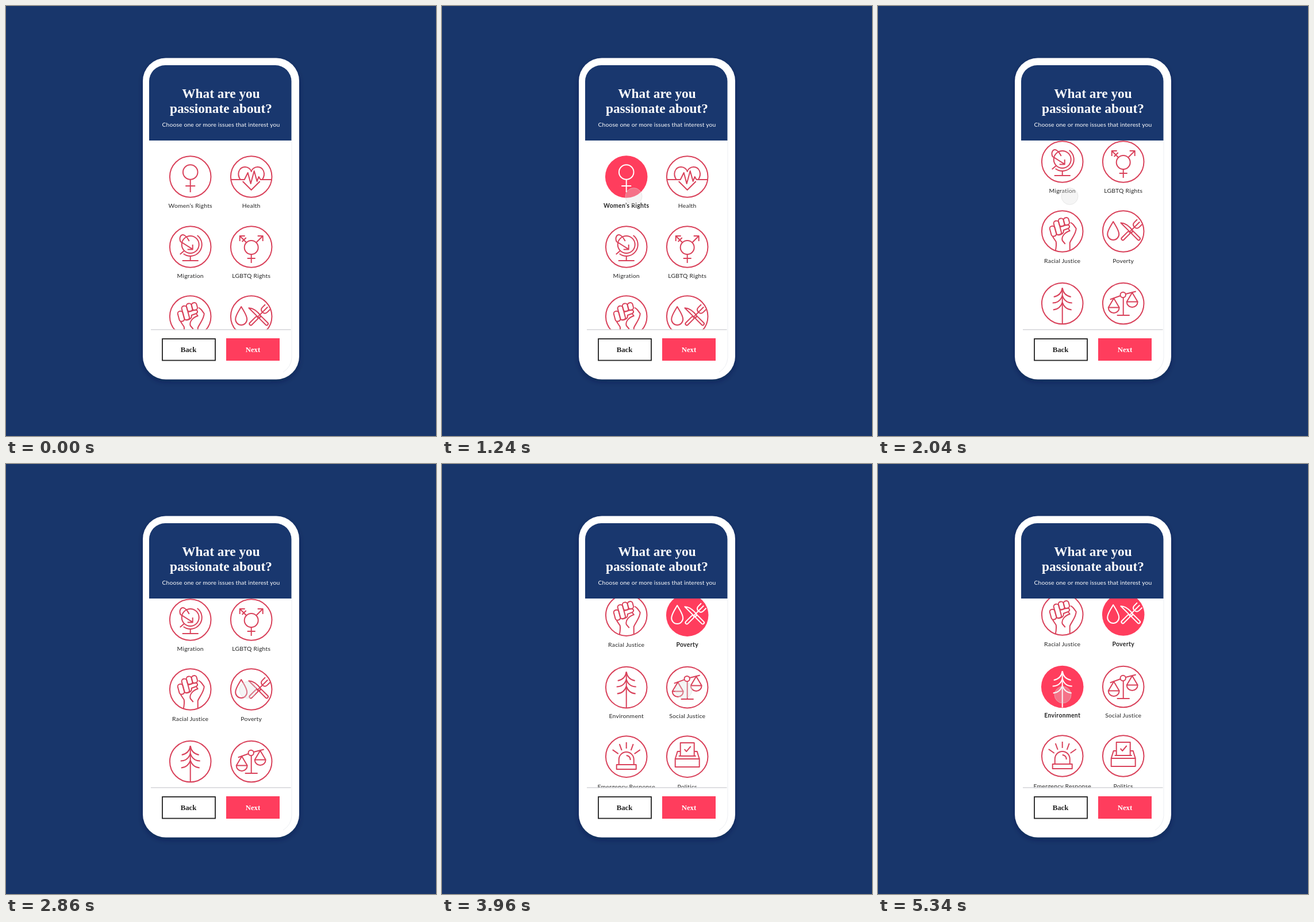
Recreate the animation shown at these times as an HTML page. Size 748 px wide and 748 px high, loop 5360 ms.

```html
<!DOCTYPE html>
<html lang="en">
<head>
<meta charset="utf-8">
<title>Issue picker</title>
<style>
  html, body { margin: 0; width: 100%; height: 100%; overflow: hidden; background: #18366b; }
  svg { display: block; width: 100vw; height: 100vh; }
  text { text-anchor: middle; }
  .serif { font-family: "Liberation Serif", "Noto Serif", serif; font-weight: 700; }
  .sans { font: 400 10.4px Lato, "Open Sans", sans-serif; letter-spacing: .22px; }
  .strong { font-weight: 700; letter-spacing: .35px; }
  .intro { font-size: 10.3px; letter-spacing: .15px; }
  .icon { fill: none; stroke-width: 2; stroke-linejoin: round; }
  .line { stroke: #d9425b; }
  .on { stroke: #fff; }
</style>
</head>
<body>
<svg viewBox="0 0 748 748">
  <defs>
    <clipPath id="view"><rect x="249" y="234" width="247.500" height="329.5"/></clipPath>
    <filter id="shade" x="-20%" y="-20%" width="140%" height="140%">
      <feDropShadow dx="0" dy="4" stdDeviation="5" flood-color="#071a3d" flood-opacity=".4"/>
    </filter>
  </defs>
  <rect width="748" height="748" fill="#18366b"/>
  <rect x="238" y="90.500" width="272" height="559" rx="40" fill="#fff" filter="url(#shade)"/>
  <path d="M497 234V612Q496 628 482 637" fill="none" stroke="#eceef2"/>
  <path d="M249 234V131a28 28 0 0 1 28-28H468.500a28 28 0 0 1 28 28V234Z" fill="#19376e"/>
  <g fill="#fff">
    <g class="serif" font-size="23.3">
      <text x="374" y="160">What are you</text>
      <text x="374" y="186">passionate about?</text>
    </g>
    <text class="sans intro" x="374" y="210">Choose one or more issues that interest you</text>
  </g>
  <g clip-path="url(#view)"><g id="list"></g></g>
  <path d="M252 563H495.500" stroke="#d3d4d8" stroke-width="1.6"/>
  <rect x="272" y="579" width="92" height="37.500" fill="#fff" stroke="#222" stroke-width="1.8"/>
  <rect x="383" y="578" width="93" height="39" fill="#ff3d5d"/>
  <g class="serif" font-size="12.7">
    <text x="317.5" y="601.500" fill="#222">Back</text>
    <text x="429.5" y="601.500" fill="#fff">Next</text>
  </g>
  <circle id="touch" r="14.5" fill="#e2e2e2" fill-opacity=".33" stroke="#d6d6d6" stroke-opacity=".5"/>
</svg>
<script>
const LOOP = 5360;
const columns = [320.7, 426.7];
const rows = [[297, 351], [419, 473], [540, 595], [665.5, 719.3], [786, 842]];

const path = (d, extra = '') => `<path d="${d}" ${extra}/>`;
const ring = (x, y, r) => `<circle cx="${x}" cy="${y}" r="${r}"/>`;
const box = (x, y, w, h, r = 0) => `<rect x="${x}" y="${y}" width="${w}" height="${h}" rx="${r}"/>`;
const pan = (x, y) => path(`M${x} ${y}l-9.500 16h19zm-9.500 16a9.500 9.500 0 0 0 19 0`);

// Icons are drawn around the centre of their circle.
const issues = [
  { name: 'Women’s Rights', selectAt: 900,
    icon: ring(0, -8, 12.8) + path('M0 5V27M-8.500 16H8.500') },
  { name: 'Health',
    icon: path('M-36 5H-12L-6-7-1 12 5-10 10 8 13 0 16 5H36') +
      path('M-19 5C-26-5-21-17-11-17-5-17-1-13 0-9 1-13 5-17 11-17 21-17 26-5 19 5M-15 8 0 23 15 8') },
  { name: 'Migration',
    icon: ring(0, -4, 15) + path('M12-20A20 20 0 1 1-12 12M-18 13-11 7M0 16V24M-14 24H14') +
      path('M4 4-17-9C-20-15-17-24-10-20-5-17-4-13-2-10M-15-8 3.500 4M4-4V4.500H-5') },
  { name: 'LGBTQ Rights',
    icon: ring(0, 1, 12) + path('M0 13V28M-7 20H7M9-8 20-19M11-19H20V-10M-9-8-20-19M-11-19H-20V-10M-16-9-9-16') },
  { name: 'Racial Justice',
    icon: `<g transform="translate(2 0) rotate(-15)">${box(-22, -14, 9, 18, 4) + box(-13, -21, 9, 25, 4) +
        box(-4, -23, 9, 14, 4) + box(5, -22, 9, 13, 4)}</g>` +
      path('M-4-8 7-11C13-12 14-7 10-5L2-2C3 3-1 6-8 6M10-5 13-1C4 2-2 9 0 16L5 22') +
      path('M-17 9-11 18Q-10 24-12 34M14-15C18-15 20-10 24-5 24 4 15 14 13 20V33') },
  { name: 'Poverty', selectAt: 3050,
    icon: path('M-17.500-17C-22-9-27.500-2-27.500 5A10 10 0 0 0-7.500 5C-7.500-2-13-9-17.500-17Z') +
      `<g transform="translate(13 -1) rotate(45)">${box(-2.5, 3, 5, 19, 2.5)}
        ${path('M0 3V-22M-6-22V-15Q-6-9 0-9 6-9 6-15V-22')}</g>
      <g transform="translate(13 -1) rotate(-45)">${box(-2.5, 3, 5, 19, 2.5)}
        ${path('M-2.500 3V-22Q5-14 2.500 3Z')}</g>` },
  { name: 'Environment', selectAt: 4700,
    icon: path('M0-27V36') + [-1, 1].map(s =>
      path('M0-27Q2-14 15-11.500M0-14Q4-1 17-1M0-2Q4 10 16 11', `transform="scale(${s} 1)"`)).join('') },
  { name: 'Social Justice',
    icon: ring(-.5, -15, 4.7) + path('M-23-7-5-13.500M4-16.500 22-21M0-10V20.500M-11 20.500H11') +
      pan(-16.5, -9) + pan(15.5, -19) },
  { name: 'Emergency Response',
    icon: path('M-13 14V5A13 13 0 0 1 13 5V14M0-2Q7-1 7 6') + box(-17, 14, 34, 8) +
      path('M0-25V-14M-12-22-8-11M12-22 8-11M-24-12-14-5M24-12 14-5') },
  { name: 'Politics',
    icon: path('M-12-1V-24H12V-1M-5-13-1.500-9 6-18M-15-1H15') + box(-21, 4, 42, 14) +
      path('M-21 4-17-9H-12M12-9H17L21 4') },
];

const label = (name, y, cls = '') => `<text class="sans ${cls}" y="${y}" fill="#252525">${name}</text>`;

const list = document.getElementById('list');
const touch = document.getElementById('touch');
list.innerHTML = issues.map(({ name, icon }, i) => {
  const [cy, base] = rows[i >> 1];
  const y = base - cy;
  return `<g transform="translate(${columns[i % 2]} ${cy})">
    <g><g class="icon line">${ring(0, 0, 35.8)}${icon}</g>${label(name, y)}</g>
    <g opacity="0"><circle r="36.800" fill="#ff3d5d"/><g class="icon on">${icon}</g>${label(name, y, 'strong')}</g>
  </g>`;
}).join('');
const items = [...list.children].map((node, i) => ({
  plain: node.children[0], chosen: node.children[1], selectAt: issues[i].selectAt,
}));

const progress = (t, start, end) => Math.min(1, Math.max(0, (t - start) / (end - start)));
const ease = (t, start, end) => (1 - Math.cos(Math.PI * progress(t, start, end))) / 2;

function draw(t) {
  const scroll = 148 * ease(t, 1510, 2010) + 130 * ease(t, 3490, 3990);
  list.setAttribute('transform', `translate(0 ${-scroll})`);

  for (const { plain, chosen, selectAt } of items) {
    if (!selectAt) continue;
    const amount = progress(t, selectAt, selectAt + 120);
    chosen.setAttribute('opacity', amount);
    plain.setAttribute('opacity', 1 - amount);
  }

  const toRight = ease(t, 2150, 2800);
  const toLeft = ease(t, 4100, 4600);
  touch.setAttribute('cx', 333.5 + 87 * toRight - 99 * toLeft);
  touch.setAttribute('cy', 331 + 62 * toRight + 8.5 * toLeft);
  touch.setAttribute('opacity', progress(t, 350, 650));
}

const begin = performance.now();
function frame() {
  draw((performance.now() - begin) % LOOP);
  requestAnimationFrame(frame);
}
draw(0);
requestAnimationFrame(frame);
</script>
</body>
</html>
```
